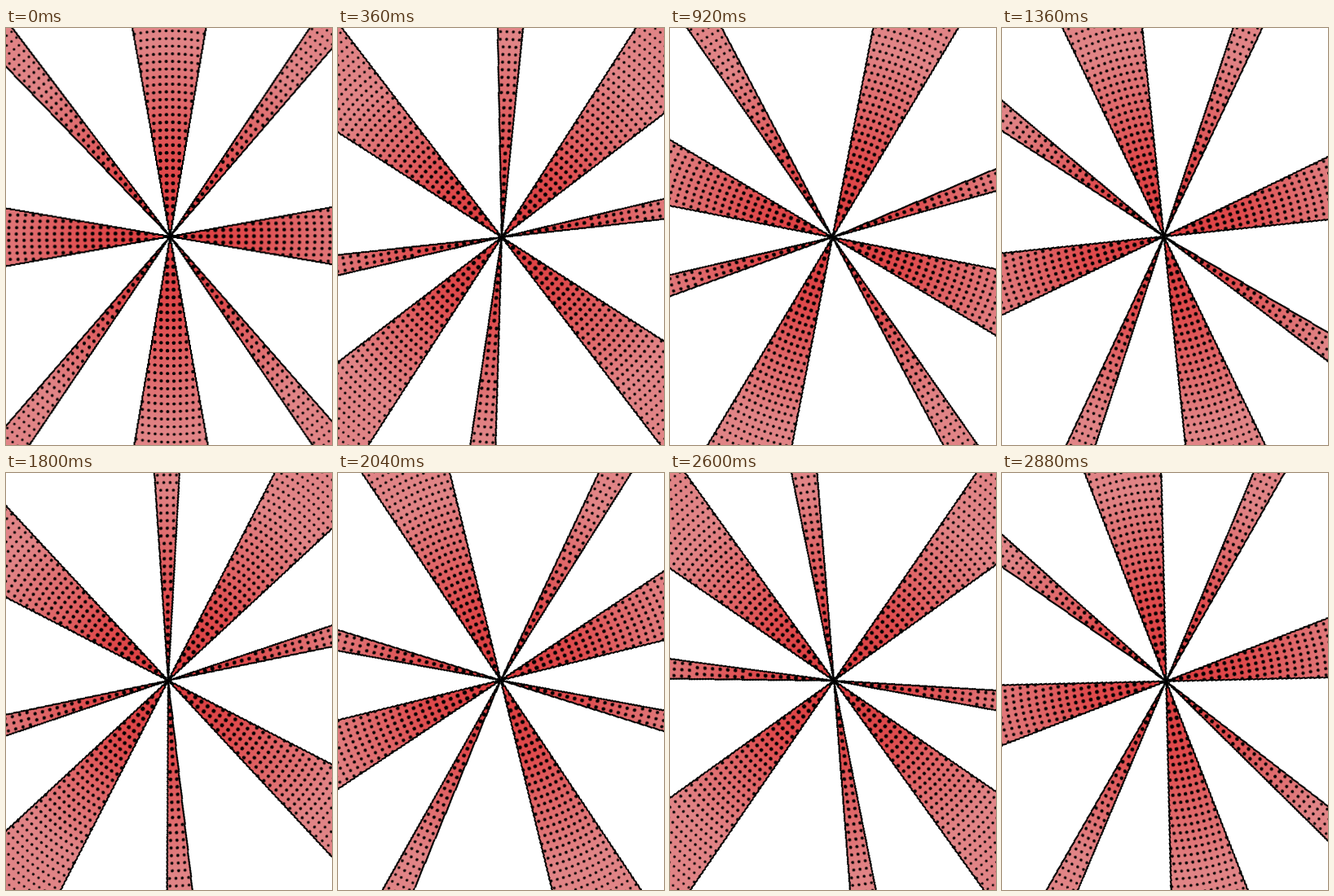
Animation, 400 px wide and 512 px high, one loop 2.92 s. Source, as an HTML page:

```html
<!DOCTYPE html>
<html lang="en">
<head>
<meta charset="utf-8">
<title>Spinning halftone sunburst</title>
<style>
  html, body { margin: 0; width: 100%; height: 100%; overflow: hidden; background: #fff; }
  svg { display: block; width: 400px; height: 512px; }

  /* The burst centre sits slightly off the pivot, so it wobbles as it turns. */
  #burst {
    transform-origin: 200px 255.8px;
    animation: spin 2920ms -1ms infinite;
  }

  /* One hold of 40 ms per step. */
  @keyframes spin {
    0%       { transform: rotate(-0.25deg);  animation-timing-function: steps(9); }
    12.3287% { transform: rotate(42.65deg);  animation-timing-function: steps(14); }
    31.5068% { transform: rotate(111deg);    animation-timing-function: steps(11); }
    46.5753% { transform: rotate(164.1deg);  animation-timing-function: steps(11); }
    61.6438% { transform: rotate(217.15deg); animation-timing-function: steps(12); }
    78.0821% { transform: rotate(275.3deg);  animation-timing-function: steps(15); }
    98.6301% { transform: rotate(348.65deg); animation-timing-function: steps(1); }
    100%     { transform: rotate(353.5deg); }
  }

  .edge {
    fill: none;
    stroke: #000;
    stroke-width: 2.1;
    stroke-linejoin: bevel;
    shape-rendering: crispEdges;
  }
</style>
</head>
<body>
<svg viewBox="0 0 400 512">
  <defs id="defs">
    <radialGradient id="red" gradientUnits="userSpaceOnUse" cx="0" cy="0" r="350">
      <stop offset="0" stop-color="#dd3a3c"/>
      <stop offset="0.29" stop-color="#df4c4e"/>
      <stop offset="0.5" stop-color="#e06c6e"/>
      <stop offset="0.68" stop-color="#e18486"/>
      <stop offset="1" stop-color="#e08486"/>
    </radialGradient>
  </defs>
  <g id="burst">
    <g id="rays" transform="translate(201.4 256)"></g>
  </g>
</svg>
<script>
  const NS = "http://www.w3.org/2000/svg";
  const LENGTH = 350, RING = 9.35, GAP = 7.8;
  const defs = document.getElementById("defs");
  const rays = document.getElementById("rays");

  function add(parent, tag, attrs) {
    const el = document.createElementNS(NS, tag);
    for (const key in attrs) el.setAttribute(key, attrs[key]);
    return parent.appendChild(el);
  }

  function outline(half) {
    const x = LENGTH * Math.sin(half), y = -LENGTH * Math.cos(half);
    return `M${-x} ${y}L0 0L${x} ${y}`;
  }

  // Draws a ray at an angle from straight up; its dots sit on rings around
  // the origin. columns(r) gives the offset of a column of dots from the axis.
  function addRay(angle, halfDegrees, columns, start = 0) {
    const half = halfDegrees * Math.PI / 180;
    const path = outline(half);
    const clipId = "clip" + Math.round(angle);
    add(add(defs, "clipPath", { id: clipId }), "path", { d: path + "Z" });

    const ray = add(rays, "g", { transform: `rotate(${angle})` });
    add(ray, "path", { d: path + "Z", fill: "url(#red)" });
    const dots = add(ray, "g", { "clip-path": `url(#${clipId})` });
    for (let r = RING + start; r < LENGTH - 5; r += RING) {
      for (let j = -9; j <= 9; j++) {
        const offset = (j + columns(r)) * GAP;
        if (Math.abs(offset) > half * r + 1) continue;
        const a = offset / r;
        add(dots, "circle", {
          cx: (r * Math.sin(a)).toFixed(2),
          cy: (-r * Math.cos(a)).toFixed(2),
          r: (2.75 - r * 0.004).toFixed(2)
        });
      }
    }
    add(ray, "path", { d: path, class: "edge" });
  }

  const onAxis = () => 0;
  const besideAxis = () => 0.5;
  // Narrow rays gain one centred dot at a time as they widen.
  const centred = r => Math.floor(r * 0.12 / GAP + 0.3) % 2 || r < 80 ? 0 : 0.5;

  addRay(0, 10, besideAxis);
  addRay(90, 10, onAxis);
  addRay(180, 10, besideAxis);
  addRay(270, 10, besideAxis, 1.7);
  for (const angle of [37.5, 142.5, 217.7, 319.7]) addRay(angle, 3.45, centred);
</script>
</body>
</html>
```
